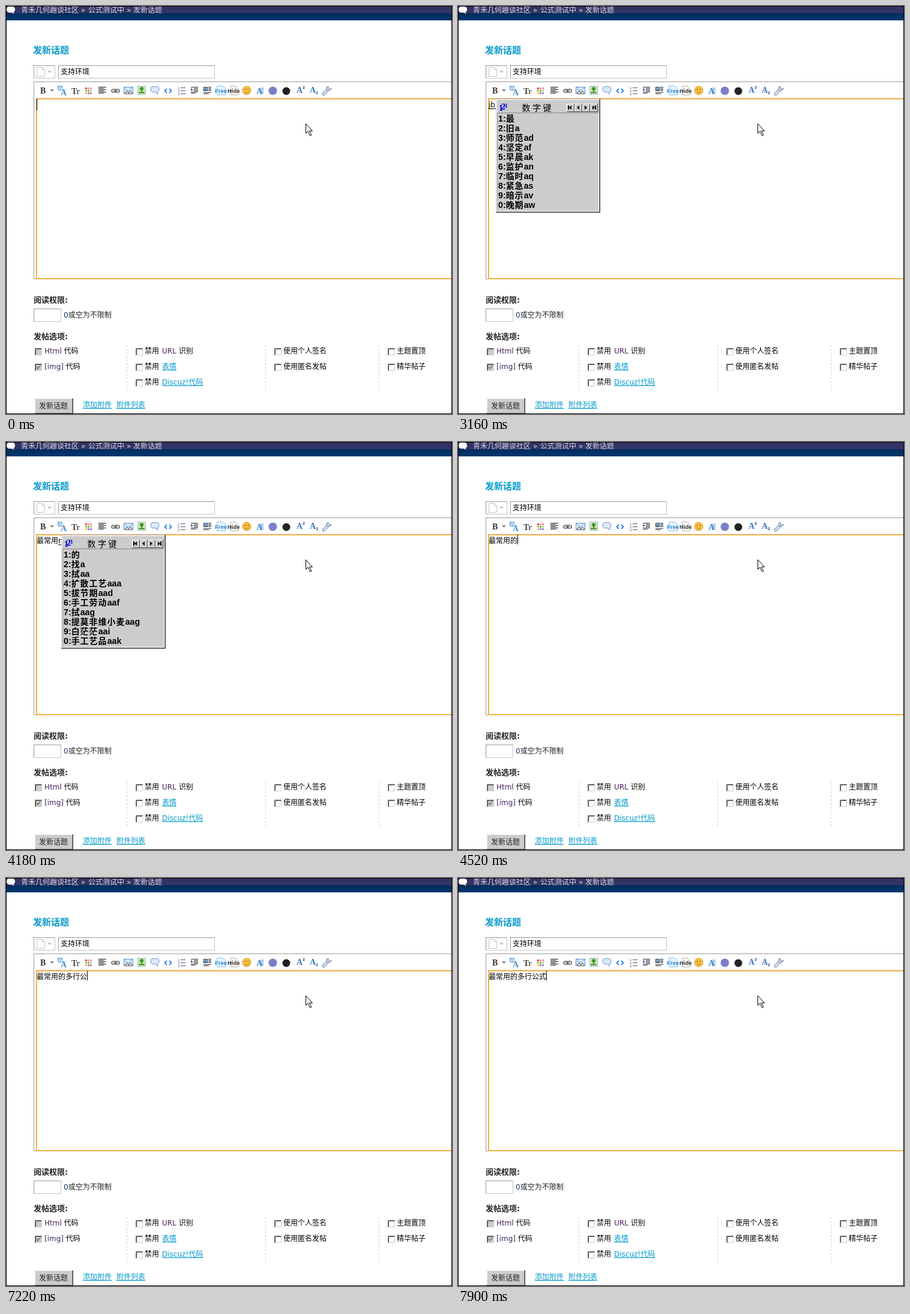
An HTML page for the animation above (8 s loop, 743 px wide and 681 px high).

```html
<!DOCTYPE html>
<html lang="zh-CN">
<head>
<meta charset="utf-8">
<title>发新话题</title>
<style>
html, body { margin: 0; width: 100%; height: 100%; overflow: hidden; background: #fff }
svg { display: block; font: 12px "DejaVu Sans", "Noto Sans CJK SC", "Noto Sans CJK", sans-serif }
text { white-space: pre }
.b { font-weight: bold; font-size: 13px; fill: #222 }
.link { fill: #09c; text-decoration: underline }
.list { font: bold 14px "Liberation Sans", "Noto Sans CJK SC", "Noto Sans CJK", sans-serif; letter-spacing: 1px }
.list tspan { font-size: 14.2px; letter-spacing: 0 }
.serif { font: bold 14px "Liberation Serif", serif }
.tiny { font: bold 9.5px "Liberation Sans", sans-serif }
</style>
</head>
<body>
<svg id="stage" width="743" height="681" viewBox="0 0 743 681"></svg>
<script>
const text = (x, y, s, attr = '') => `<text x="${x}" y="${y}" ${attr}>${s}</text>`;
const rect = (x, y, w, h, fill, attr = '') =>
  `<rect x="${x}" y="${y}" width="${w}" height="${h}" fill="${fill}" ${attr}/>`;
const box = (x, y, w, h, stroke, fill = '#fff') =>
  rect(x + .5, y + .5, w - 1, h - 1, fill, `stroke="${stroke}"`);
const field = (x, y, w, h) =>
  rect(x, y, w, h, '#c4c4c4') + rect(x, y, w - 1, h - 1, '#999') + rect(x + 1, y + 1, w - 2, h - 2, '#fff');
const path = (d, fill = 'none', stroke = 'none', attr = '') =>
  `<path d="${d}" fill="${fill}" stroke="${stroke}" ${attr}/>`;
const circle = (x, y, r, fill, attr = '') => `<circle cx="${x}" cy="${y}" r="${r}" fill="${fill}" ${attr}/>`;
const bars = (list, fill) => list.map(([x, y, w]) => rect(x, y, w, 1, fill)).join('');

function header() {
  const crumbs = [[25, '青禾几何趣谈社区'], [125, '»'], [137, '公式测试中'], [201, '»'], [212, '发新话题']];
  return rect(0, 0, 743, 12, '#336') + rect(0, 12, 743, 12, 'url(#navy)')
    + path('M4 1H12Q15 2 15 6Q15 10 12 10L14 13L9 11H5Q1 10 1 6Q1 2 4 1', '#fff')
    + crumbs.map(([x, s]) => text(x, 11, s, 'fill="#d8d8e4"')).join('');
}

function toolbar() {
  let s = text(57, 146, 'B', 'class="serif" fill="#333"') + path('M73 139h7l-3.500 4z', '#888');
  // font face and size
  s += rect(86, 133, 8, 8, '#7ab0e0', 'rx="1"') + text(87, 140, 'A', 'class="tiny" fill="#fff" font-style="italic"')
    + text(91, 149, 'A', 'class="serif" font-style="italic" fill="#4a8fd0"')
    + text(109, 147, 'T', 'class="serif" fill="#444"') + text(117, 147, 'r', 'class="serif" fill="#666"');
  ['#d44', '#e9a', '#e8a', '#e96', '#6b5', '#ad6', '#fb3', '#69d', '#a7c'].forEach((c, i) =>
    s += rect(132 + i % 3 * 4, 136 + (i / 3 | 0) * 4, 3, 3, c));
  s += bars([[154, 135, 13], [154, 137, 9], [154, 139, 13], [154, 141, 9], [154, 143, 13], [154, 145, 9]], '#222');
  // link and mail
  s += rect(176, 139, 7, 5, 'none', 'rx="2.5" stroke="#666" stroke-width="1.6"')
    + rect(182, 139, 7, 5, 'none', 'rx="2.5" stroke="#666" stroke-width="1.6"') + rect(179, 141, 7, 1, '#444')
    + box(196, 135, 16, 12, '#5b93c7', '#dceefb') + path('M196 135l8 7 8-7M196 147l6-6M212 147l-6-6', 'none', '#5b93c7')
    + rect(199, 143, 5, 4, '#eee', 'rx="2" stroke="#555"') + rect(205, 143, 5, 4, '#eee', 'rx="2" stroke="#555"');
  // image, quote, code
  s += box(219, 133, 14, 15, '#9bb7c8', '#e8f6d8') + rect(221, 135, 10, 7, '#bfe29a')
    + circle(226, 138, 3, '#3a9a2c') + rect(225, 140, 2, 4, '#484') + rect(221, 143, 10, 3, '#5aa83a')
    + path('M244 134.500H252Q255 135 255 139Q255 143 252 143.500L253 147L248 143.500H244Q241 143 241 139Q241 135 244 134.500',
      '#dcebfb', '#6c95cf')
    + path('M268 138l-3.500 3.500 3.500 3.500M272 138l3.500 3.500-3.500 3.500', 'none', '#2c7fe0', 'stroke-width="1.8"');
  // lists and indents
  [0, 1, 2].forEach(i => s += text(286, 139 + i * 5, i + 1, 'font-size="5" fill="#246"') + rect(291, 136 + i * 5, 8, 1, '#555'));
  s += bars([[308, 135, 12], [313, 137, 7], [313, 139, 7], [313, 141, 7], [308, 143, 12], [308, 145, 8]], '#333')
    + path('M308 137l4 2.500-4 2.500z', '#36a')
    + bars([[337, 135, 5], [337, 137, 5], [337, 139, 5], [337, 141, 5], [329, 144, 13], [329, 146, 9]], '#333')
    + rect(329, 135, 7, 7, '#333') + rect(330, 136, 5, 5, '#9cf') + circle(332.5, 139, 1.5, '#357');
  // free and hide pages
  s += path('M351.500 133.500h10l4 4v11h-14z', '#e4f3ff', '#8fc3ea') + text(348, 145, 'Free', 'class="tiny" fill="#2a85c8"')
    + path('M373.500 133.500h9l4 4v11h-13z', '#f5f5f5', '#bbb') + text(369, 145, 'Hide', 'class="tiny" fill="#333"');
  // smiley, plain marks and letters
  s += circle(401, 141, 7, '#ffc33c', 'stroke="#e09020"') + circle(398.5, 139, 1, '#753') + circle(403.5, 139, 1, '#753')
    + path('M397 142.500q4 4.500 8 0', 'none', '#974')
    + rect(424, 136, 5, 11, '#a9cdf0') + text(417, 147, 'A', 'class="serif" font-style="italic" fill="#3a80c8"')
    + circle(444.5, 141.5, 7, '#7b7fc9') + circle(467, 142, 6.5, '#222')
    + text(484, 145, 'A', 'class="serif" font-style="italic" fill="#3a78c0"') + text(494, 138, '2', 'font-size="6" font-weight="bold" fill="#247"')
    + text(506, 145, 'A', 'class="serif" font-style="italic" fill="#3a78c0"') + text(516, 147, '2', 'font-size="6" font-weight="bold" fill="#247"');
  s += path('M529 147l6-6', 'none', '#6f8fb8', 'stroke-width="5" stroke-linecap="round"')
    + path('M529 147l6-6', 'none', '#dbe7f5', 'stroke-width="3" stroke-linecap="round"')
    + path('M537 134q-4 1-3 5l2 2q5 1 6-4l-3 2-2-2z', '#ccd6e2', '#667a94');
  return s;
}

function checkbox(x, y, off, tick) {
  return rect(x, y, 12, 12, off ? '#ccc' : '#fff') + path(`M${x + .5} ${y + 12}V${y + .5}H${x + 12}`, 'none', '#808080')
    + path(`M${x + 1.5} ${y + 11}V${y + 1.5}H${x + 11}`, 'none', '#404040')
    + path(`M${x + 11.5} ${y + 1}V${y + 11.5}H${x + 1}`, 'none', '#ccc')
    + (tick ? path(`M${x + 3} ${y + 5.5}l2 2.500 4-4.500`, 'none', '#777', 'stroke-width="1.8"') : '');
}

function form() {
  let s = text(45, 79, '发新话题', 'font-size="15" font-weight="bold" fill="#09c"');
  s += field(46, 99, 36, 22) + path('M51.500 102.500h9l4 4v11h-13zM60.500 102.500v4h4', '#fff', '#c4c4c4')
    + path('M69 108h7l-3.500 4z', '#c4c4c4') + field(87, 99, 261, 22) + text(91, 114, '支持环境');
  // editor with its focus ring
  s += path('M743 126.500H46.500V455.500H51', 'none', '#999') + toolbar()
    + rect(50, 154, 693, 302, '#e8a030') + rect(51, 155, 692, 300, '#ffc84a') + rect(52, 156, 691, 298, '#fff')
    + rect(50, 154, 693, 1, '#d89450');
  s += text(46, 495, '阅读权限:', 'class="b"') + field(46, 505, 46, 22)
    + text(96, 520, '<tspan fill="#1d3b70">0</tspan>或空为不限制', 'fill="#222"') + text(46, 556, '发帖选项:', 'class="b"');
  for (const x of [201.5, 432.5, 621.5])
    s += path(`M${x} 566V644`, 'none', '#ccc', 'stroke-dasharray="3 3"');
  s += checkbox(48, 571, true) + text(64, 580, '<tspan fill="#4a2060">Html</tspan> 代码')
    + checkbox(48, 597, true, true) + text(64, 606, '<tspan fill="#402868">[img]</tspan> 代码');
  [0, 1, 2].forEach(i => s += checkbox(216, 571 + i * 26) + text(231, 580 + i * 26, '禁用'));
  s += text(260, 580, '<tspan fill="#4a2060">URL</tspan> 识别') + text(260, 606, '表情', 'class="link"')
    + text(260, 632, 'Discuz!代码', 'class="link"');
  [[447, '使用个人签名', '使用匿名发帖'], [636, '主题置顶', '精华帖子']].forEach(([x, ...labels]) =>
    labels.forEach((label, i) => s += checkbox(x, 571 + i * 26) + text(x + 15, 580 + i * 26, label)));
  s += rect(48, 655, 64, 26, '#404040') + rect(48, 655, 63, 25, '#808080') + rect(48, 655, 62, 24, '#eee')
    + rect(49, 656, 61, 23, '#ccc') + text(55, 672, '发新话题', 'fill="#222"')
    + text(128, 670, '添加附件', 'class="link"') + text(184, 670, '附件列表', 'class="link"');
  return s;
}

const pointer = path('M499.500 196.500V212.500l3.500-3.500 3.500 7.500 2.500-1-3.500-7h5z', '#fff', '#000');

// key code -> [code width, candidates]
const candidates = {
  jb: [12, '最 旧a 师范ad 坚定af 早晨ak 监护an 临时aq 紧急as 暗示av 晚期aw'],
  ip: [11, '学 黉a 学期ad 海军基地af 活塞式保护器ak 学艺an 省军区aq 活塞式冷水机as 深切av 黉aw'],
  e: [8, '有 肛a 及aa 胸花aaa 脱节aad 肥工aaf 服药aag 采花aah 胶片aai 腰鼓aak'],
  r: [5, '的 找a 拭aa 扩散工艺aaa 拔节期aad 手工劳动aaf 拭aag 提莫非维小麦aag 白茫茫aai 手工艺品aak'],
  a: [8, '工 式a 工aa 工aaa 恭恭敬敬aaa 芜菁甘蓝aaa 黄花苜蓿aaa 工期aad 黄花菜aae 茎芥菜aae']
};

function popup(x, words) {
  let s = rect(x, 155, 174, 190, '#404040') + rect(x, 155, 173, 189, '#ccc')
    + rect(x + 1, 156, 172, 188, '#808080') + rect(x + 1, 156, 171, 187, '#fff') + rect(x + 2, 157, 170, 186, '#ccc')
    + path(`M${x + 2} 178.500H${x + 171}M${x + 2.5} 178V342`, 'none', '#888')
    + path(`M${x + 171.500} 178V342.500H${x + 2}`, 'none', '#fff')
    + text(x + 5, 175, '1', 'class="serif" fill="#00c"') + text(x + 9, 173, '2', 'class="serif" fill="#00f"')
    + text(x + 14, 170, '3', 'class="serif" style="font-size:10px" fill="#00c"');
  [...'数字键'].forEach((c, i) => s += text(x + 43.5 + i * 17.5, 175, c, 'font-size="14"'));
  for (let i = 0; i < 4; i++) {
    const bx = x + 118 + i * 13, left = i < 2, m = bx + 6;
    s += rect(bx, 163, 13, 14, '#404040') + rect(bx, 163, 12, 13, '#fff') + rect(bx + 1, 164, 11, 12, '#ccc')
      + path(left ? `M${m + 2} 166v7l-4-3.500z` : `M${m - 2} 166v7l4-3.500z`, '#000');
    if (i % 3 === 0) s += rect(left ? m - 4 : m + 2, 166, 2, 7, '#000');
  }
  words.split(' ').forEach((w, i) => s += text(x + 4, 193 + i * 16,
    `${(i + 1) % 10}:${w}`.replace(/[\w:]+/g, '<tspan>$&</tspan>'), 'class="list"'));
  return s;
}

// [start ms, characters typed, caret "|" or key code or nothing]
const steps = [
  [0, 0, '|'], [100, 0, ''], [440, 0, '|'], [1120, 0, ''], [1460, 0, '|'], [2140, 0, ''], [2480, 0, '|'],
  [3160, 0, 'jb'], [3480, 1, 'ip'], [3840, 2, 'e'], [4180, 3, 'r'],
  [4520, 4, '|'], [4840, 4, ''], [5200, 4, '|'], [5880, 4, ''],
  [6200, 5, '|'], [6880, 6, '|'], [7220, 7, '|'], [7560, 7, 'a'], [7900, 8, '|']
];

function typing([, n, mark]) {
  const x = 51 + 12 * n, s = text(51, 169, '最常用的多行公式'.slice(0, n));
  if (!mark) return s;
  if (mark === '|') return s + rect(x, 155, 1, n ? 16 : 19, '#000');
  const [w, words] = candidates[mark];
  return s + text(x, 169, mark) + rect(x, 171, w, 1, '#000') + popup(x + w, words);
}

const stage = document.getElementById('stage');
stage.innerHTML = '<linearGradient id="navy" x2="0" y2="1"><stop stop-color="#002c5c"/><stop offset="1" stop-color="#00376e"/></linearGradient>'
  + header() + form() + '<g id="typing"></g>' + pointer
  + rect(.5, .5, 742, 680, 'none', 'stroke="#000"');

const layer = document.getElementById('typing');
let shown;
function draw() {
  const t = performance.now() % 8000;
  const step = steps.findLast(([start]) => t >= start);
  if (step !== shown) layer.innerHTML = typing(shown = step);
  requestAnimationFrame(draw);
}
draw();
</script>
</body>
</html>
```
